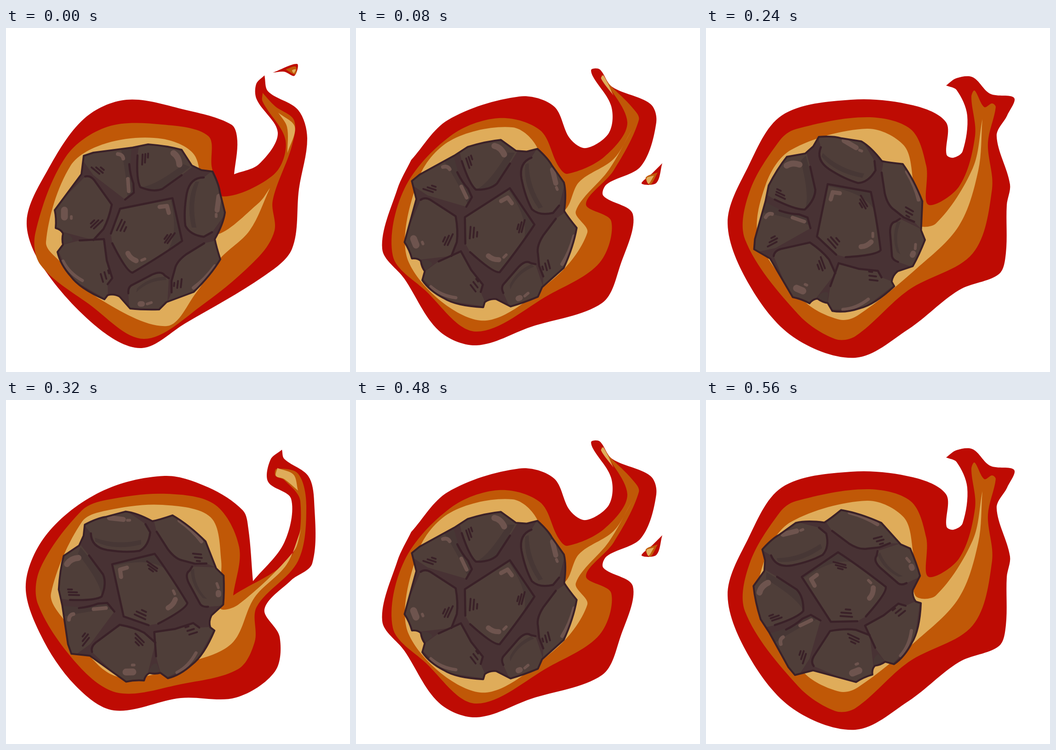
Animation of 748x748 px, one loop 0.64 s. Source, as an HTML page with a canvas:

```html
<!DOCTYPE html>
<html>
<head>
<meta charset="utf-8">
<title>Meteor</title>
<style>
html, body { margin: 0; width: 100%; height: 100%; overflow: hidden; background: #fff; }
canvas { display: block; width: 100vmin; height: 100vmin; }
</style>
</head>
<body>
<canvas id="stage" width="748" height="748"></canvas>
<script>
const ctx = document.getElementById('stage').getContext('2d');
const STEP = 80;
const RED = '#be0b03', ORANGE = '#c05807', YELLOW = '#dfac5a';
const GAP = '#483234', PLATE = '#4f3e39', SHADE = '#473735', LINE = '#3a2128', SHINE = '#6e544e';

const distance = (p, q) => Math.hypot(q[0] - p[0], q[1] - p[1]);

// Bezier handle at b on the side of c, for a curve running a, b, c.
function handle(a, b, c) {
  const near = distance(b, c), total = near + distance(a, b) || 1;
  return [0, 1].map(k => b[k] + (c[k] - a[k]) * near / total / 3);
}

// Closed smooth curve through "x,y" points; "!" marks a sharp corner.
function blob(text) {
  const pts = text.trim().split(/\s+/).flatMap(s => {
    const p = s.replace('!', '').split(',').map(Number);
    return s.endsWith('!') ? [p, p] : [p];
  });
  const n = pts.length, path = new Path2D();
  path.moveTo(...pts[0]);
  pts.forEach((b, i) => {
    const a = pts[(i + n - 1) % n], c = pts[(i + 1) % n], d = pts[(i + 2) % n];
    path.bezierCurveTo(...handle(a, b, c), ...handle(d, c, b), ...c);
  });
  path.closePath();
  return path;
}

// Each layer may hold several blobs separated by "/".
const flame = (...layers) => layers.flatMap((layer, i) =>
  layer.split('/').map(text => [[RED, ORANGE, YELLOW][i], blob(text)]));

const hooked = flame(
  `262,156 390,178 490,210 503,245 496,318! 550,296 591,228 545,155 544,122 562,103! 570,138 635,178
   655,240 637,350 622,480 560,540 390,642 295,696 200,652 80,520 45,420 90,310 170,197
   / 580,97! 633,78 627,104 605,95`,
  `340,210 440,235 448,305 470,366 583,318 608,245 558,160 558,141! 585,170 626,200 622,255 580,375
   584,440 550,497 430,600 300,676 180,600 75,515 64,445 130,280 220,215
   / 608,90! 630,84 629,101`,
  `340,241 412,280 425,400 455,450 550,380 574,348! 530,440 465,502 414,575 350,648 205,590 120,510
   87,465 140,300 220,250 / 592,184! 628,215 612,272! 611,215 / 622,92 630,90 626,98`);

const swirled = flame(
  `355,149 430,170 465,240 500,261 550,228 555,170 515,105 512,90 530,90 557,128 640,165 653,205
   620,300 545,340 538,365 602,405 575,515 535,598 380,650 262,690 180,658 105,545 57,480 90,350
   120,287! 200,200 / 666,294! 653,337 621,338 645,315`,
  `310,196 400,222 440,300 460,317 540,280 590,205 533,103 553,125 600,172 615,200 560,310 500,383
   555,420 530,510 420,580 260,660 150,570 80,495 105,350 205,235 / 656,314! 640,341 630,325`,
  `340,216 395,262 420,390 455,395 485,335 560,285 600,221! 550,308 478,398 503,445 430,545 270,636
   115,510 135,330 205,245 / 538,103 560,147! 533,110 / 648,321! 636,339 632,326`);

const forked = flame(
  `335,153 450,178 500,240 522,259 543,243 545,160 578,101 597,143 650,150 645,205 630,232 585,270
   587,360 605,383 640,388 648,420 600,520 485,602 320,698 265,713 165,650 75,530 39,395 75,270
   160,185 / 568,80 576,74 568,87`,
  `340,192 425,225 452,310 490,317 572,225 567,180 578,144 585,160 588,192 623,174 629,185 582,255
   552,370 588,400 570,460 435,560 320,655 285,667 205,635 110,520 67,405 92,330 150,240`,
  `310,226 420,258 446,350 475,383 525,330 575,222 579,193 590,213 540,325 532,355 560,405 530,465
   448,527 265,633 190,580 95,465 95,400 195,255`);

const trailing = flame(
  `345,165 440,190 515,240 527,280 537,394! 605,310 620,215 570,178 575,130 600,108! 605,128 657,165
   670,220 666,355 620,392 562,455 595,515 585,590 500,647 380,648 235,675 150,620 75,510 43,400
   90,290 205,200`,
  `350,204 455,228 507,320 494,425! 620,340 640,220 605,174 586,165 588,150 635,160 653,230 635,350
   545,450 541,525 505,585 380,618 245,637 160,580 70,445 75,365 165,240 220,217`,
  `340,228 445,255 468,350 465,452 505,445 625,330 642,280! 610,358 540,430 495,525 425,562 240,601
   120,470 98,420 165,265 220,240 / 590,148! 625,162 635,197! 605,172 587,165`);

const curled = flame(
  `315,156 450,168 522,205 523,275 538,282 558,268 568,190 545,135 522,125! 545,109 580,107 618,143
   670,152 655,190 632,235 661,340 654,385 652,490 637,535 550,570 440,655 325,717 190,672 95,560
   47,425 90,305 165,190`,
  `350,194 445,220 479,300 483,384 550,345 585,235 577,150 584,136 605,172 622,164 630,172 613,250
   622,350 580,490 440,570 325,670 280,676 200,622 85,460 95,355 160,245 195,220`,
  `350,219 430,255 450,330 455,425 500,425 580,305 601,198! 592,310 550,430 458,523 330,625 290,634
   215,595 115,460 130,340 185,265`);

const outline = new Path2D(`M169 278L190 271 275 260 309 253Q350 256 382 265L404 299 425 309 449 312
  Q463 340 465 357L476 401Q473 425 454 459 457 475 466 503 445 538 408 574L349 596 333 612
  Q298 613 270 610L247 584Q234 577 221 581L214 590Q160 566 141 540 118 514 112 487L124 471
  Q121 460 124 447 120 438 108 435 110 415 106 396L164 318Z`);

// Plates: visible seam, then the rest of the border
const plates = [
  ['M268 296Q270 320 277 338L278 358 259 373', 'L190 320 160 278 272 255'],
  ['M286 277Q283 330 292 346 320 358 340 350L382 320', 'L408 300 380 250 290 250'],
  ['M430 325Q400 325 393 360 386 400 390 430 400 450 430 454L448 444', 'L480 400 452 308'],
  ['M431 468L392 492Q370 508 367 525L360 550V575', 'L352 594 470 560 466 460'],
  ['M266 577Q265 565 272 560L318 536Q338 527 345 538L354 544', 'L350 615 268 612'],
  ['M160 462L213 459 219 505 231 544 221 557', 'L222 592 140 545 110 475'],
  ['M172 323Q183 320 192 331L230 384Q224 415 212 437L190 461', 'L110 440 100 396'],
  ['M228 447L248 393 362 370 383 463Q340 494 275 532 262 530 231 468', '']
].map(([seam, rest]) => ({ seam: new Path2D(seam), area: new Path2D(seam + rest) }));

const shades = new Path2D(`M250 262H273L270 300 277 357 264 368Q262 320 250 262
  M292 346Q322 345 386 296L400 302 340 350Q315 358 292 346
  M412 334Q390 375 404 434H414Q402 380 420 334
  M285 566Q312 541 346 541L349 548Q310 548 283 575
  M362 375L383 465 350 485Q376 450 358 374
  M124 445Q145 450 145 463L126 470`);

// Hatching: start, direction and spacing of three shrinking strokes
const hatches = new Path2D([
  [186, 303, 17, 14, 10, 0], [297, 275, -1, 22, 6, -1], [241, 440, 11, -23, 8, 1],
  [367, 446, -16, 22, -8, 2], [210, 418, -19, 18, -9, 0], [206, 535, 5, 17, 8, -4],
  [382, 546, -2, 18, -8, 4]
].map(([x, y, dx, dy, sx, sy]) => [1, 0.85, 0.4].map((size, i) =>
  `M${x + sx * i} ${y + sy * i}l${dx * size} ${dy * size}`).join('')).join(''));

// Highlights: stroke width and path
const shines = [
  [15, 'M127 396v15'], [6, 'M142 410v4'], [8, 'M243 274q11 1 12 10'], [8, 'M265 328l2 27'],
  [13, 'M364 272q12 8 13 25'], [11, 'M463 366l-4 30'], [6, 'M457 405v5'],
  [9, 'M334 389l16-2 4 15'], [11, 'M265 490q5 11 18 16'], [6, 'M295 505l7-3'],
  [7, 'M124 507q13 26 42 42'], [8, 'M454 518q-21 29-46 47'], [12, 'M292 600h4'], [6, 'M307 600l9-3']
].map(([width, d]) => [width, new Path2D(d)]);

function stroke(path, color, width) {
  ctx.strokeStyle = color;
  ctx.lineWidth = width;
  ctx.stroke(path);
}

function fill(path, color) {
  ctx.fillStyle = color;
  ctx.fill(path);
}

function drawRock(x, y, degrees) {
  ctx.save();
  ctx.translate(x, y);
  ctx.rotate(degrees * Math.PI / 180);
  ctx.translate(-291, -432);
  ctx.lineCap = ctx.lineJoin = 'round';
  ctx.save();
  ctx.clip(outline);
  fill(outline, GAP);
  plates.forEach(plate => fill(plate.area, PLATE));
  fill(shades, SHADE);
  shines.forEach(([width, path]) => stroke(path, SHINE, width));
  ctx.restore();
  plates.forEach(plate => stroke(plate.seam, LINE, 4.5));
  stroke(hatches, LINE, 4);
  stroke(outline, LINE, 4);
  ctx.restore();
}

// Poses: flame, rock centre, rock angle
const swirl = [swirled, 291, 432, -21.3];
const curl = [curled, 292, 428, -111.5];
const poses = [
  [hooked, 291, 432, 0], swirl, [forked, 293, 431, -42.8], [curled, 294, 429, -67],
  [trailing, 294, 427, -91], curl, swirl, curl
];

function draw(time) {
  const [shapes, x, y, angle] = poses[Math.floor(time / STEP) % poses.length];
  ctx.clearRect(0, 0, 748, 748);
  shapes.forEach(([color, path]) => fill(path, color));
  drawRock(x, y, angle);
}

const start = performance.now();
function tick() {
  draw(performance.now() - start);
  requestAnimationFrame(tick);
}
tick();
</script>
</body>
</html>
```
